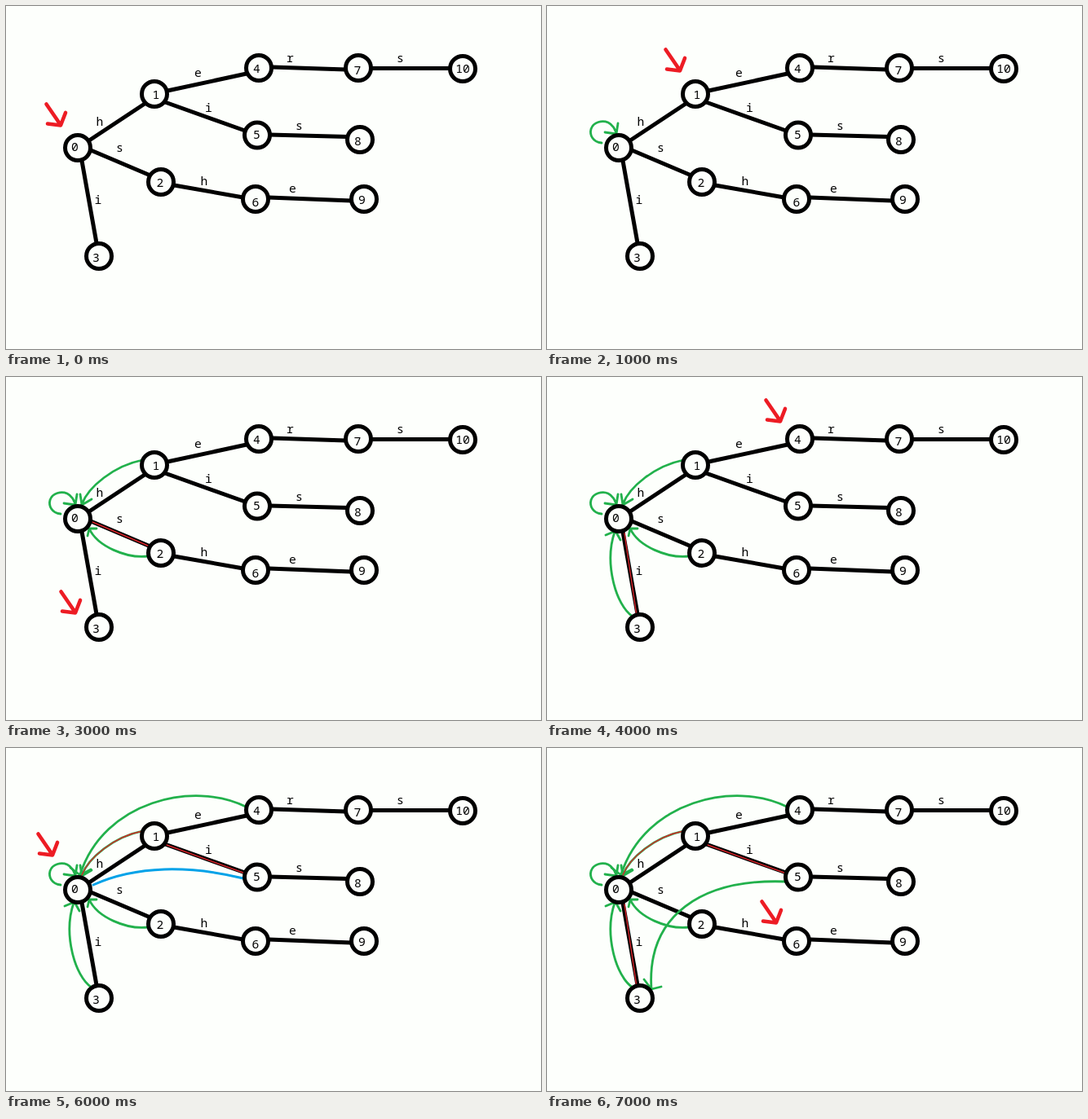
An HTML page that plays this animation: 656 px wide and 421 px high, repeating every 8 s.

```html
<!DOCTYPE html>
<html lang="en">
<head>
<meta charset="utf-8">
<title>Trie failure links</title>
<style>
  html, body { margin: 0; width: 100%; height: 100%; overflow: hidden; background: #fdfffc; }
  svg { display: block; width: 656px; height: 421px; }
  path { fill: none; stroke-linecap: round; stroke-linejoin: round; }
  text { font: 14.67px "Noto Sans Mono", "DejaVu Sans Mono", monospace; text-anchor: middle; }
  .edge { stroke: #000; stroke-width: 5; }
  .link { stroke: #22b14c; stroke-width: 2.8; }
  .try { stroke: #00a2e8; stroke-width: 3; }
  .walk { stroke: #d8242a; stroke-width: 1.4; }
  .cursor { stroke: #ed1c24; stroke-width: 4.6; }
  circle { fill: #fdfffc; stroke: #000; stroke-width: 5; }
</style>
</head>
<body>
<svg id="stage" viewBox="0 0 656 421"></svg>
<script>
const stage = document.getElementById('stage');
const STEP = 1000, STEPS = 8;

function add(tag, attrs, text) {
  const el = document.createElementNS('http://www.w3.org/2000/svg', tag);
  for (const k in attrs) el.setAttribute(k, attrs[k]);
  if (text !== undefined) el.textContent = text;
  return stage.appendChild(el);
}
const stroke = (cls, d) => add('path', { class: cls, d });
const label = (s, x, y) => add('text', { x, y }, s);

// centre x, y, then label x, baseline
const nodes = [
  [88, 174, 84.5, 178], [182, 108, 184, 114], [190, 216, 189, 222],
  [114, 307, 110.5, 314], [310, 76, 307.5, 82], [308, 158.5, 307.5, 163],
  [306, 237, 306, 246], [432, 76, 431, 84], [434, 164, 431.5, 171],
  [439, 237, 436.5, 243], [560, 77, 560, 82]
];

// line, letter, letter x, baseline
const edges = [
  ['M102 165L170 120', 'h', 115, 147],
  ['M104 177L177 208', 's', 139.5, 179],
  ['M93 190L111 291', 'i', 113, 243],
  ['M198 104L295 83', 'e', 235.5, 87],
  ['M195 118L293 153', 'i', 248.5, 130],
  ['M206 220L291 235', 'h', 243, 220],
  ['M326 75L417 78', 'r', 348.5, 69],
  ['M323 158L419 160.5', 's', 359.5, 152],
  ['M322 235L424 239', 'e', 351.5, 229],
  ['M448 76.5L545 76.5', 's', 483.5, 69]
];
for (const [d] of edges) stroke('edge', d);

const back = 'M167 102C132 109 101 135 93 156';

// class, path, steps [first, last] in which it shows
const marks = [
  ['link', 'M67 168C56 167 52 158 54 151C57 142 68 140 75 143C81 146 83 151 85 156M71 155L85 157L87 144', [1, 7]],
  ['link', back + 'M91 144L93 157L105 150', [2, 7]],
  ['link', 'M174 220C148 223 112 208 102 186M100 195L102 186L111 186', [3, 7]],
  ['link', 'M105 294C84 280 70 228 83 190M72 194L84 189L90 200', [4, 7]],
  ['link', 'M294 72C230 40 120 65 91 155M79 147L91 156L104 149', [5, 7]],
  ['try', 'M107 168C160 144 225 144 291 160', [6, 6]],
  ['link', 'M293 164C190 160 122 205 128 296M119 284L128 296L140 293', [7, 7]],
  ['walk', 'M104 164.5L168 122', [2, 2]],
  ['walk', 'M106 178L174 207', [3, 3]],
  ['walk', 'M95 192L109.5 290', [4, 4]],
  ['walk', 'M199 104L294 84', [5, 5]],
  ['walk', 'M197 119L292 153.5', [6, 7]],
  ['walk', 'M95 192L109.5 290', [7, 7]],
  ['walk', back, [5, 7]]
].map(([cls, d, span]) => ({ el: stroke(cls, d), span }));

nodes.forEach(([cx, cy, x, y], i) => {
  add('circle', { cx, cy, r: 15.5 });
  label(i, x, y);
});
for (const [, letter, x, y] of edges) label(letter, x, y);

const cursor = stroke('cursor', 'M49.5 120.5L67 146M73 131L67 146.5L51 144.5');
const stops = [
  [0, 0], [96, -67], [123, 43], [18, 143],
  [219, -92], [235, -9], [-10, -15], [214, 68]
];

function draw(ms) {
  const step = Math.floor(ms / STEP) % STEPS;
  for (const { el, span } of marks) {
    el.style.display = step >= span[0] && step <= span[1] ? '' : 'none';
  }
  cursor.setAttribute('transform', `translate(${stops[step]})`);
}

const start = performance.now();
function tick() {
  draw(performance.now() - start);
  requestAnimationFrame(tick);
}
tick();
</script>
</body>
</html>
```
